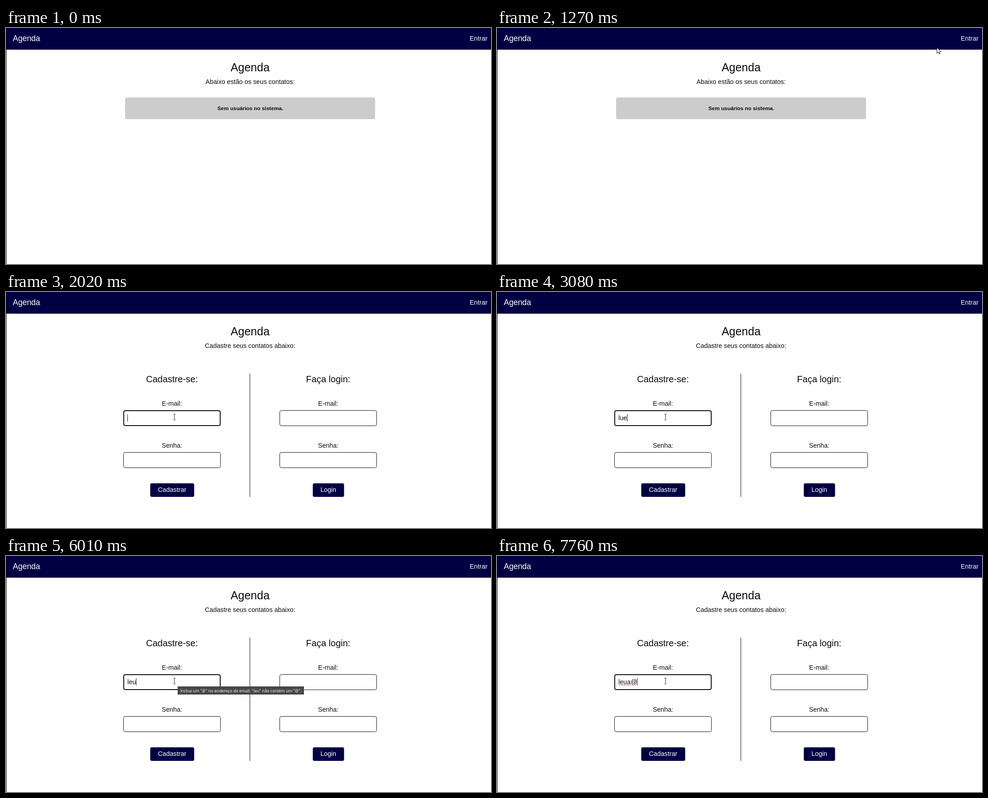
An HTML page for the animation above (8 s loop, 1071x523 px).

```html
<!DOCTYPE html>
<html lang="pt-BR">
<head>
<meta charset="utf-8">
<title>Agenda</title>
<style>
  html, body { margin: 0; width: 100%; height: 100%; overflow: hidden; background: #fff; }
  svg { display: block; font: 14.24px "Liberation Sans", Arial, sans-serif; fill: #0c0c0c; }
  .mid { text-anchor: middle; }
  .light { fill: #fff; }
  .navy { fill: #000042; }
  .field { fill: #fff; stroke: #111; }
  .tip { font: 9.05px "Open Sans", sans-serif; fill: #fff; }
</style>
</head>
<body>
<svg width="1071" height="523" viewBox="0 0 1071 523">
  <rect class="navy" width="1071" height="48"/>
  <rect width="1" height="523"/>
  <text class="light" x="15" y="29" font-size="17.5">Agenda</text>
  <text class="light" x="1024" y="28" font-size="14.4">Entrar</text>
  <text class="mid" x="539" y="96" font-size="25">Agenda</text>
  <text class="mid" id="intro" x="539" y="123.5"></text>

  <g id="list">
    <rect x="263" y="154" width="552" height="48" rx="4" fill="#ccc"/>
    <text class="mid" x="539.5" y="182" font-size="11.8" font-weight="bold">Sem usuários no sistema.</text>
  </g>

  <g id="forms">
    <rect x="538" y="181" width="1" height="273"/>
    <g id="columns" class="mid"></g>
    <rect id="focus" class="field" x="260" y="263" width="213" height="33" rx="3.5" stroke-width="2"/>
    <text id="typed" x="268" y="284"></text>
    <path id="squiggle" d="M268 287l1.5 -1.5" fill="none" stroke="#e8202a" stroke-width=".9"/>
    <rect id="caret" y="271" width="1" height="16"/>
    <g id="tip">
      <rect id="tipBox" x="379" y="289" height="18" fill="#474747"/>
      <text id="tipText" class="tip" x="385" y="301.5"></text>
    </g>
  </g>

  <g id="cursor" stroke="#111" fill="#fff" stroke-width="1" stroke-linejoin="round">
    <path id="arrow" d="M.5 .5V13L3.3 10.4 5.3 14.8 7.4 13.9 5.5 9.6H9.3Z"/>
    <path id="hand" d="M4 1.5q1.2 -1.5 2.3 0V6l5 1.2q1.2 .4 1 1.8L11.5 14.5H5L1 9.5q0 -1.6 1.5 -1L4 10Z"/>
    <path id="beam" fill="none" d="M-2.5 -6.5H-1L0 -5.5 1 -6.5H2.5M0 -5.5V5.5M-2.5 6.5H-1L0 5.5 1 6.5H2.5"/>
  </g>
</svg>
<script>
const LOOP = 8000, FORM_AT = 1340, FOCUS_AT = 1940;
const $ = id => document.getElementById(id);
const show = (id, on) => $(id).setAttribute("display", on ? "inline" : "none");

// One form: heading, two labelled fields and a button
function column(cx, title, action, width) {
  const field = (label, y) => `
    <text x="${cx}" y="${y - 10.5}">${label}</text>
    <rect class="field" x="${cx - 107}" y="${y + .5}" width="214" height="34" rx="4"/>`;
  return `<text x="${cx}" y="199.5" font-size="20">${title}</text>
    ${field("E-mail:", 262)}${field("Senha:", 355)}
    <rect class="navy" x="${cx + .5 - width / 2}" y="424" width="${width}" height="30" rx="3.5"/>
    <text class="light" x="${cx + .3}" y="443">${action}</text>`;
}
$("columns").innerHTML = column(366.5, "Cadastre-se:", "Cadastrar", 97)
                       + column(711.5, "Faça login:", "Login", 69);
$("squiggle").setAttribute("d", "M268 286.8" + "l1.5 -1.6l1.5 1.6".repeat(9));

// [time, x, y, shape]
const moves = [
  [250, 1052, 441, "arrow"], [320, 1044, 402, "arrow"], [390, 1034, 340, "arrow"],
  [460, 1023, 262, "arrow"], [530, 1015, 185, "arrow"], [600, 1013, 120, "arrow"],
  [670, 1017, 76, "arrow"], [740, 1025, 47, "arrow"], [800, 1030, 32, "arrow"],
  [940, 1031, 26, "hand"], [1010, 1030, 22, "hand"], [1080, 1030, 32, "hand"],
  [1270, 971, 43, "arrow"], [1340, 757, 82, "arrow"], [1400, 600, 142, "arrow"],
  [1470, 500, 196, "arrow"], [1540, 434, 238, "arrow"], [1600, 396, 263, "beam"],
  [1670, 379, 273, "beam"], [1730, 372, 277, "beam"]
];

// [time, text, caret visible, tooltip visible]
const typing = [
  [FOCUS_AT, "", 1, 0], [2480, "", 0, 0], [2810, "l", 1, 0], [2880, "lu", 1, 0],
  [3080, "lue", 1, 0], [3480, "lu", 1, 0], [3610, "l", 1, 0], [3810, "le", 1, 0],
  [3880, "leu", 1, 0], [4420, "leu", 0, 1], [5020, "leu", 1, 1], [5480, "leu", 0, 1],
  [6010, "leu", 1, 1], [6420, "leu", 0, 1], [6490, "leu", 0, 0], [6890, "leua", 1, 0],
  [7030, "leua", 1, 1], [7490, "leua@", 1, 1], [7560, "leua@", 1, 0]
];
const current = (steps, t) => steps.findLast(s => s[0] <= t);

function drawCursor(t) {
  const move = current(moves, t);
  show("cursor", move);
  if (!move) return;
  const [, x, y, shape] = move;
  $("cursor").setAttribute("transform", `translate(${x} ${y})`);
  for (const id of ["arrow", "hand", "beam"]) show(id, id === shape);
}

function drawTyping(t) {
  const [, text, caret, tip] = current(typing, t) || [0, "", 0, 0];
  const name = text.replace("@", "");
  $("typed").textContent = text;
  const end = 268 + (text ? $("typed").getComputedTextLength() : 0);
  $("caret").setAttribute("x", Math.floor(end));
  show("caret", caret);
  show("squiggle", name.length > 3);
  show("tip", tip);
  if (!tip) return;
  $("tipText").textContent = `Inclua um "@" no endereço de email. "${name}" não contém um "@".`;
  $("tipBox").setAttribute("width", Math.round($("tipText").getComputedTextLength() + 12));
}

function draw(now) {
  const t = now % LOOP, form = t >= FORM_AT;
  show("list", !form);
  show("forms", form);
  $("intro").textContent = form ? "Cadastre seus contatos abaixo:" : "Abaixo estão os seus contatos:";
  show("focus", t >= FOCUS_AT);
  if (form) drawTyping(t);
  drawCursor(t);
  requestAnimationFrame(draw);
}
const start = performance.now();
draw(0);
function draw0() {}
</script>
</body>
</html>
```
